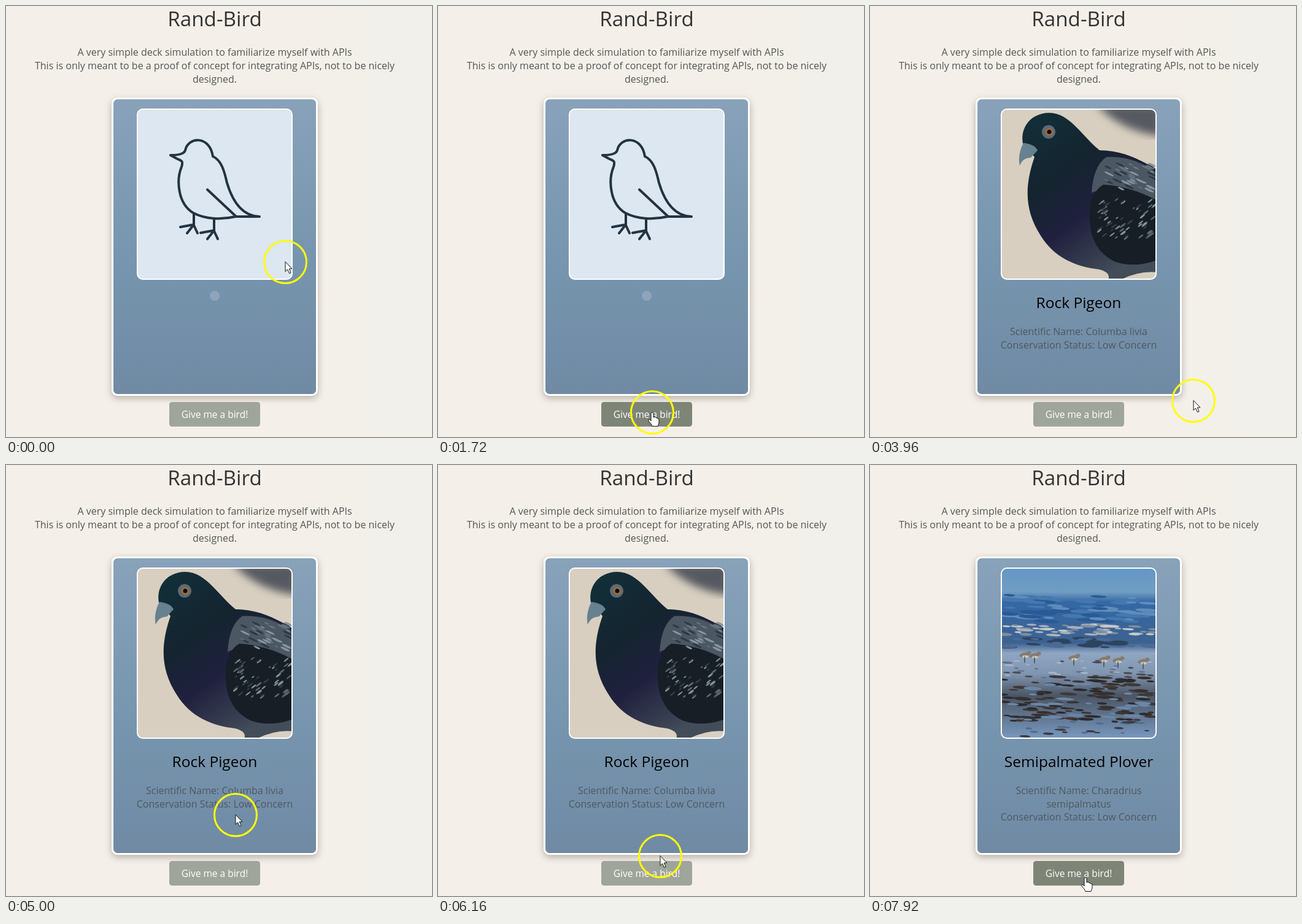
Animation of 694x702 px, one loop 8 s. Source, as an HTML page:

```html
<!DOCTYPE html>
<html lang="en">
<head>
<meta charset="utf-8">
<title>Rand-Bird</title>
<style>
html, body { margin: 0; width: 100%; height: 100%; overflow: hidden; background: #f4f0e9; }
svg { display: block; width: 100%; height: 100%; }
text { font: 16px "Open Sans", "Noto Sans", sans-serif; text-anchor: middle; fill: #555; }
.title { font-size: 33.2px; fill: #333; }
.info text { fill: #4f5860; }
.info tspan { font-weight: 500; }
.info .name { font-size: 24.5px; font-weight: 500; fill: #000; }
.line { fill: none; stroke: #233342; stroke-width: 4; stroke-linecap: round; stroke-linejoin: round; }
#card { filter: drop-shadow(0 4px 6px rgba(70, 55, 45, .35)); }
#label { font-size: 15.5px; fill: #fff; }
</style>
</head>
<body>
<svg viewBox="0 0 694 702">
  <defs>
    <linearGradient id="page"><stop offset=".7" stop-color="#f4f0e9"/><stop offset="1" stop-color="#f1f0eb"/></linearGradient>
    <linearGradient id="blue" x2="0" y2="1"><stop stop-color="#88a2ba"/><stop offset=".55" stop-color="#7795ae"/><stop offset="1" stop-color="#708aa4"/></linearGradient>
    <linearGradient id="sea" x2="0" y2="1">
      <stop stop-color="#6297c4"/><stop offset=".14" stop-color="#719dc2"/><stop offset=".2" stop-color="#3468a5"/>
      <stop offset=".44" stop-color="#3d6290"/><stop offset=".5" stop-color="#8fa6c2"/><stop offset=".62" stop-color="#8095b0"/>
      <stop offset=".75" stop-color="#4b5565"/><stop offset="1" stop-color="#7898bf"/>
    </linearGradient>
    <linearGradient id="body" x2=".6" y2="1"><stop stop-color="#12303a"/><stop offset=".4" stop-color="#14242f"/><stop offset=".65" stop-color="#20203e"/><stop offset="1" stop-color="#434d59"/></linearGradient>
    <clipPath id="frame"><rect x="214" y="168" width="252" height="277" rx="9"/></clipPath>
    <filter id="soft"><feGaussianBlur stdDeviation="7"/></filter>
    <rect id="photo" x="214" y="168" width="252" height="277" rx="9"/>
  </defs>

  <rect width="694" height="702" fill="url(#page)"/>
  <text class="title" x="340" y="33">Rand-Bird</text>
  <text x="340" y="81">A very simple deck simulation to familiarize myself with APIs</text>
  <text x="340" y="102.5">This is only meant to be a proof of concept for integrating APIs, not to be nicely</text>
  <text x="340" y="124.5">designed.</text>

  <rect id="card" x="173.5" y="150.5" width="333" height="483" rx="8" fill="url(#blue)" stroke="#fff" stroke-width="3"/>
  <use href="#photo" fill="#dce7f1"/>

  <g id="doodle">
    <path class="line" d="M268 243C278 243 290 242 292 235C297 212 332 211 337 245C351 251 356 270 360 288C366 308 379 342 413 343H374C352 348 326 348 305 337C280 322 277 284 286 262C289 252 286 252 279 249ZM328 299L375 343"/>
    <path id="leg" class="line" d="M306 338V357M284 360L306 356L295 370M306 357L312 370"/>
    <use href="#leg" x="33" y="9.500"/>
    <circle cx="340" cy="472" r="8" fill="#8fa3bb"/>
  </g>

  <g id="pigeon" clip-path="url(#frame)">
    <use href="#photo" fill="#d8cfc0"/>
    <path fill="#565a60" filter="url(#soft)" d="M368 160H475V212Q410 205 368 160Z"/>
    <path fill="url(#body)" d="M249 224C244 196 264 174 292 174C326 174 347 214 374 235C414 235 445 253 470 268V434Q440 430 408 446H388Q393 434 373 429C336 425 300 410 278 374C251 332 252 292 268 246Z"/>
    <path fill="#668290" d="M244 260Q240 242 250 223Q268 225 273 235L262 247Q249 247 244 260Z"/>
    <path fill="#4b5763" d="M361 304Q364 260 385 246Q430 243 470 274V331Q410 285 361 304Z"/>
    <path fill="#171e26" d="M358 350Q355 306 380 291Q424 293 470 318V413Q430 428 398 416Q360 397 358 350Z"/>
    <g id="feathers"/>
    <circle cx="291" cy="205" r="11" fill="#5a6b75"/>
    <circle cx="292" cy="205" r="5" fill="#080b0d" stroke="#a06a3c" stroke-width="3"/>
  </g>

  <g id="shore" clip-path="url(#frame)"><use href="#photo" fill="url(#sea)"/></g>
  <use href="#photo" fill="none" stroke="#fff" stroke-width="2"/>

  <g id="rock" class="info">
    <text class="name" x="340" y="492">Rock Pigeon</text>
    <text x="340" y="536"><tspan>Scientific Name:</tspan> Columba livia</text>
    <text x="340" y="557.5"><tspan>Conservation Status:</tspan> Low Concern</text>
  </g>
  <g id="plover" class="info">
    <text class="name" x="340" y="492">Semipalmated Plover</text>
    <text x="340" y="536"><tspan>Scientific Name:</tspan> Charadrius</text>
    <text x="340" y="557.5">semipalmatus</text>
    <text x="340" y="579"><tspan>Conservation Status:</tspan> Low Concern</text>
  </g>

  <rect id="button" x="266" y="645" width="148" height="40" rx="4.5"/>
  <text id="label" x="340" y="671">Give me a bird!</text>

  <g id="pointer">
    <circle id="ring" r="34.5" fill="none" stroke="#ff0" stroke-width="3"/>
    <path id="arrow" fill="#fff" stroke="#111" d="M0 -.5V15.500L3.500 12L6.500 18.500L9 17.500L6.300 11H11Z"/>
    <path id="hand" fill="#fff" stroke="#111" d="M-2 1Q0 -1.500 2 1V8Q4.500 5.500 5.500 8.500Q7.500 7 8.500 10Q11 9 11 12V16Q11 18 9 22.500H0Q-1 19 -5.500 14.500Q-7 11.500 -5 11Q-3 11.500 -2 14Z"/>
  </g>
</svg>
<script>
const el = id => document.getElementById(id);
const show = (id, on) => el(id).style.display = on ? '' : 'none';
let seed = 7;
const rand = (a, b) => {
  seed = seed * 16807 % 2147483647;
  return a + (b - a) * seed / 2147483647;
};

function blot(group, cx, cy, rx, ry, fill, turn = 0) {
  const e = document.createElementNS('http://www.w3.org/2000/svg', 'ellipse');
  const attrs = { cx, cy, rx, ry, fill, transform: `rotate(${turn} ${cx} ${cy})` };
  for (const key in attrs) e.setAttribute(key, attrs[key]);
  el(group).append(e);
}
// Random streaks between two heights, starting at x = left
function scatter(group, n, left, top, bottom, size, colors, turn = 3) {
  for (let i = 0; i < n; i++) {
    const rx = rand(size / 3, size);
    blot(group, rand(left, 466), rand(top, bottom), rx, rand(.5, 1) + rx / 9, colors[i % colors.length], turn);
  }
}

scatter('feathers', 40, 385, 258, 300, 9, ['#8795a0', '#2c3843', '#65737f'], 25);
scatter('feathers', 60, 372, 315, 378, 6, ['#87949b', '#5b6770', '#343f48'], -38);
scatter('shore', 60, 214, 212, 255, 22, ['#2a5a96', '#5f8cba', '#4478b0']);
scatter('shore', 50, 214, 260, 277, 14, ['#a9b1ba', '#7f8d9d', '#c6cacd']);
scatter('shore', 25, 214, 283, 297, 22, ['#2d435e', '#4a6b95']);
scatter('shore', 40, 214, 318, 348, 9, ['#4a4c55', '#a3b5cb', '#65718a']);
scatter('shore', 150, 214, 345, 418, 15, ['#2c2a2e', '#3f3836', '#35312f', '#6c86a8']);
scatter('shore', 20, 214, 418, 442, 10, ['#526b89', '#3c3b40']);

for (const x of [252, 268, 332, 381, 404, 445]) {
  const y = 309 + (x - 252) / 18;
  blot('shore', x, y, 9, 3.5, '#857b6e', -12);
  blot('shore', x + 1, y + 3, 5, 2, '#cfc9bf');
  blot('shore', x + 7, y - 3, 3.5, 3, '#857b6e');
  blot('shore', x, y + 8, .8, 6, '#444b50');
}

// Pointer moves: start, end, x, y
const moves = [
  [500, 960, 361, 643], [960, 1320, 349, 662], [3400, 3760, 527, 643],
  [4340, 5000, 374, 570], [5200, 5900, 362, 637], [6200, 6760, 351, 672]
];
const clamp = u => Math.max(0, Math.min(1, u));
const ease = u => u * u * (3 - 2 * u);
const locate = t => moves.reduce(([px, py], [start, end, x, y]) => {
  const k = ease(clamp((t - start) / (end - start)));
  return [px + (x - px) * k, py + (y - py) * k];
}, [455, 417]);

function draw(now) {
  const t = now % 8000, [x, y] = locate(t);
  const over = x > 266 && x < 414 && y > 645 && y < 685;
  const click = t < 3380 ? 2200 : 7000;
  show('doodle', t < 2600);
  show('rock', t >= 2600 && t < 7440);
  show('pigeon', t >= 2680 && t < 7440);
  show('plover', t >= 7440);
  show('shore', t >= 7560);
  show('hand', over);
  show('arrow', !over);
  el('button').setAttribute('fill', over ? '#7e8577' : '#a0a59b');
  el('ring').setAttribute('opacity', 1 - clamp((t - click) / 200));
  el('pointer').setAttribute('transform', `translate(${x} ${y})`);
  requestAnimationFrame(draw);
}
draw(0);
</script>
</body>
</html>
```
